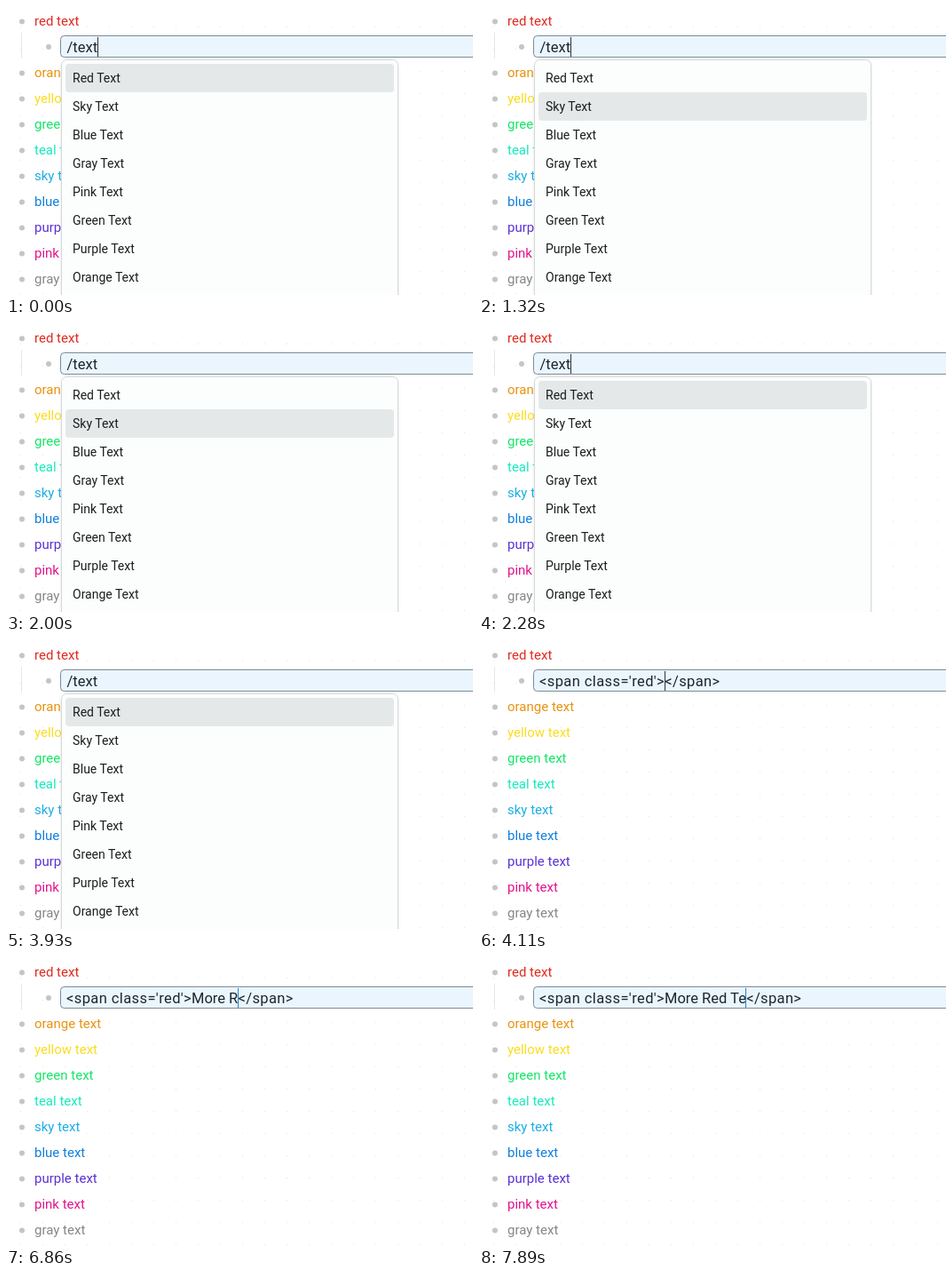
These frames come from a looping animation (526x325 px, 8000 ms). An HTML page:

```html
<!DOCTYPE html>
<html lang="en">
<head>
<meta charset="utf-8">
<title>Coloured text commands</title>
<style>
  html, body { margin: 0; width: 100%; height: 100%; overflow: hidden; background: #fff; }
  svg { display: block; width: 526px; height: 325px; font-family: Roboto, "Open Sans", sans-serif; }
  text { white-space: pre; }
  .row { font-size: 15px; }
  .item { font-size: 14px; fill: #1b1d1e; }
  .edit { font-size: 16.5px; fill: #1d262e; }
  .tag { letter-spacing: 0.35px; }
</style>
</head>
<body>
<svg id="stage" viewBox="0 0 526 325">
  <defs>
    <pattern id="dots" x="16" y="23" width="25" height="25" patternUnits="userSpaceOnUse">
      <rect width="1" height="1" fill="#e4e4e4"/>
    </pattern>
    <filter id="soft" x="-5%" y="-5%" width="110%" height="110%">
      <feDropShadow dx="0" dy="1" stdDeviation="1.5" flood-color="#000" flood-opacity="0.1"/>
    </filter>
  </defs>
  <rect width="526" height="325" fill="url(#dots)"/>
  <rect x="17" y="30" width="1" height="29" fill="#e6e6e6"/>
  <g id="rows"></g>
  <circle cx="48" cy="46" r="3" fill="#c5c5c5"/>
  <rect x="61.5" y="33.5" width="480" height="24" rx="4" fill="#eaf5fd" stroke="#7f8b94"/>
  <text id="query" class="edit" x="68.5" y="52">/text</text>
  <g id="code">
    <text class="edit" style="letter-spacing:.4px" x="68" y="52">&lt;span class='red'&gt;</text>
    <text id="typed" class="edit" x="209" y="52"></text>
    <text id="tail" class="edit tag" y="52">&lt;/span&gt;</text>
  </g>
  <rect id="caret" y="35" width="1" height="22"/>
  <g id="menu">
    <rect x="62.5" y="60.5" width="379" height="300" rx="6" fill="#fcfefd" stroke="#d6d9d9" filter="url(#soft)"/>
    <rect id="mark" x="67" width="370" height="32" rx="4" fill="#e5e8e8"/>
    <g id="items"></g>
  </g>
</svg>
<script>
const LOOP = 8000;
const SWAP = 4110;      // menu closes, tag is inserted
const TYPE_START = 5880;
const PHRASE = "More Red Te";

const rows = [
  ["red", "#e0291f"], ["orange", "#e8930f"], ["yellow", "#fbdd1e"], ["green", "#14e667"],
  ["teal", "#14ebbd"], ["sky", "#1aaee4"], ["blue", "#117fde"], ["purple", "#5c30d4"],
  ["pink", "#e3128b"], ["gray", "#868686"]
];
const items = ["Red", "Sky", "Blue", "Gray", "Pink", "Green", "Purple", "Orange"];

// [time, value] steps
const marks = [[0, 0], [1320, 1], [1630, 2], [2000, 1], [2280, 0]];
const blinks = [[0, 1], [390, 0], [970, 1], [1570, 0], [2130, 1], [2740, 0], [3330, 1],
  [3930, 0], [4110, 1], [4730, 0], [5300, 1]];
const keys = [5880, 6040, 6145, 6250, 6530, 6860, 7070, 7260, 7410, 7740, 7890];

const $ = id => document.getElementById(id);

function add(parent, tag, attrs, text) {
  const el = document.createElementNS("http://www.w3.org/2000/svg", tag);
  for (const name in attrs) el.setAttribute(name, attrs[name]);
  if (text) el.textContent = text;
  parent.append(el);
}

rows.forEach(([name, fill], i) => {
  const y = i ? 46 + 29 * i : 17;
  add($("rows"), "circle", { cx: 18, cy: y + 0.5, r: 3, fill: "#c5c5c5" });
  add($("rows"), "text", { class: "row", x: 32, y: y + 5, fill }, name + " text");
});
items.forEach((name, i) =>
  add($("items"), "text", { class: "item", x: 75, y: 86 + 32 * i }, name + " Text"));

const stepAt = (steps, t) => steps.filter(([start]) => start <= t).pop()[1];
const show = (id, on) => $(id).setAttribute("visibility", on ? "visible" : "hidden");

function draw(t) {
  const inserted = t >= SWAP;
  show("query", !inserted);
  show("menu", !inserted);
  show("code", inserted);
  show("caret", stepAt(blinks, t));
  $("mark").setAttribute("y", 65 + 32 * stepAt(marks, t));

  const count = keys.filter(k => k <= t).length;
  $("typed").textContent = PHRASE.slice(0, count);
  const end = 209 + (count ? $("typed").getComputedTextLength() : 0);
  $("tail").setAttribute("x", end + 0.3);
  $("caret").setAttribute("x", inserted ? Math.floor(end) : 103);
  $("caret").setAttribute("fill", t >= TYPE_START ? "#1f86c9" : "#2b353d");
}

const origin = performance.now();
function tick() {
  draw((performance.now() - origin) % LOOP);
  requestAnimationFrame(tick);
}
tick();
</script>
</body>
</html>
```
